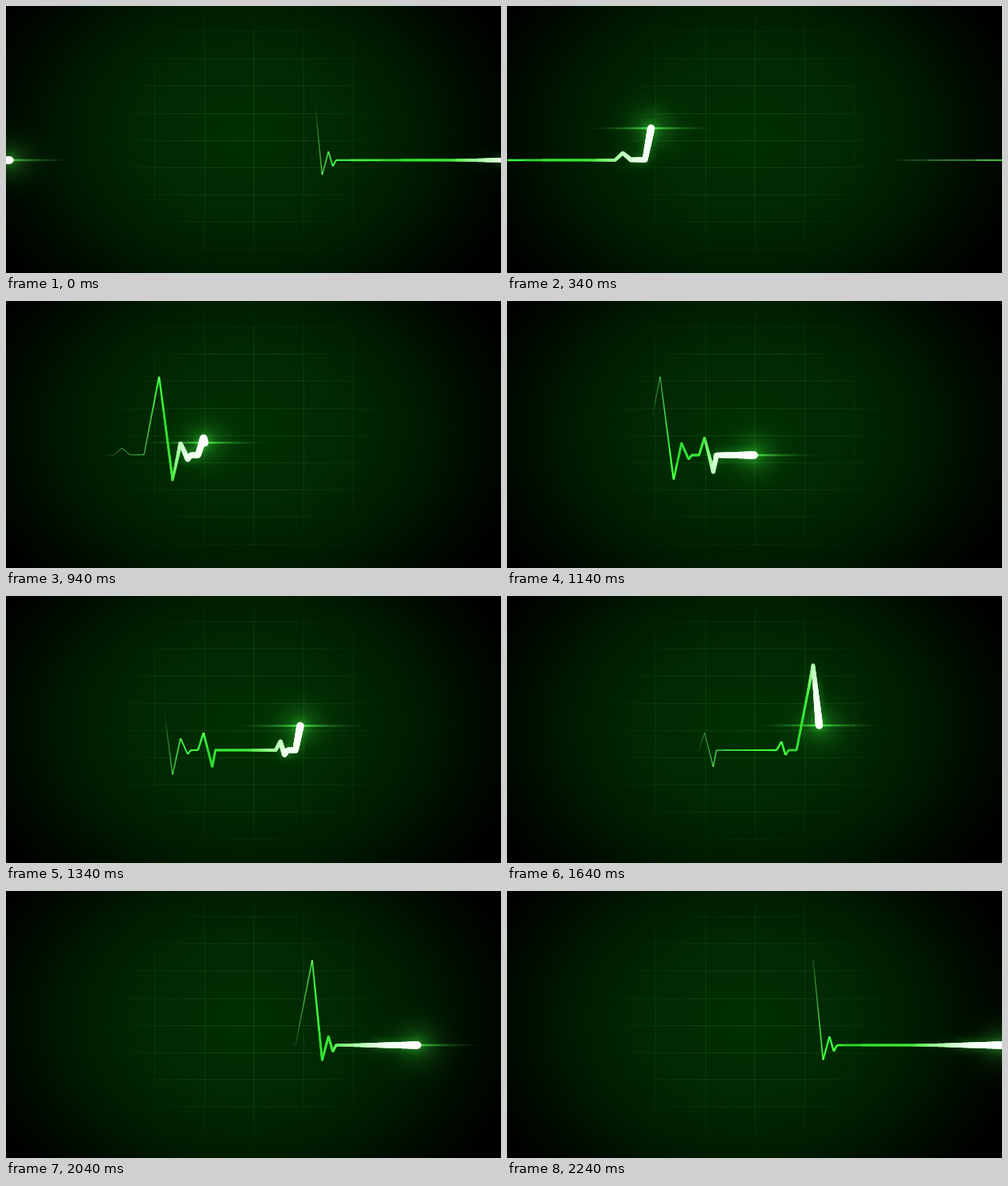
Recreate the animation shown at these times as an HTML page with a canvas. Size 624 by 336 pixels, loop 2340 ms.

```html
<!DOCTYPE html>
<html lang="en">
<head>
<meta charset="utf-8">
<title>Heart monitor</title>
<style>
html, body { margin: 0; width: 100%; height: 100%; overflow: hidden; background: #000; }
canvas { display: block; }
</style>
</head>
<body>
<canvas id="stage" width="624" height="336"></canvas>
<script>
const W = 624, H = 336, LOOP = 2340, TAIL = 408, BASE = 194;
const canvas = document.getElementById('stage');
const ctx = canvas.getContext('2d');

// Heartbeat line; it runs past the right edge before wrapping
const pulse = [
  [0, BASE], [136, BASE], [146, 185], [156, 193.5], [174, 193.5], [193, 95], [210, 225],
  [220, 179], [229, 199], [233, BASE], [242, BASE], [249, 172], [260, 215],
  [264, BASE], [340, BASE], [346, 183], [351, 200], [355, BASE], [365, BASE],
  [386, 87], [398.5, 213], [406.5, 183], [412, 202], [416, BASE], [670, BASE]
];
const dist = [0];
for (let i = 1; i < pulse.length; i++) {
  const [a, b] = [pulse[i - 1], pulse[i]];
  dist.push(dist[i - 1] + Math.hypot(b[0] - a[0], b[1] - a[1]));
}
const LENGTH = dist[dist.length - 1];

// Rows of [key, value, value...], blended linearly
function ramp(rows, x) {
  if (x <= rows[0][0]) return rows[0].slice(1);
  for (let i = 1; i < rows.length; i++) {
    const a = rows[i - 1], b = rows[i];
    if (x <= b[0]) {
      const k = (x - a[0]) / (b[0] - a[0]);
      return a.slice(1).map((v, j) => v + (b[j + 1] - v) * k);
    }
  }
  return rows[rows.length - 1].slice(1);
}

const route = pulse.map((p, i) => [dist[i], p[0], p[1]]);
const pointAt = s => ramp(route, s);

// step -> distance travelled by the head
const travel = [[0, 5], [4, 221], [10, 526], [14, 740], [17, 894], [21, 1107], [23, 1212]];

// distance behind the head -> width, r, g, b, alpha
const trail = [
  [0, 9.6, 255, 255, 255, 1],
  [45, 6.6, 235, 255, 235, 1],
  [80, 4.3, 165, 252, 160, 1],
  [115, 3, 65, 232, 60, 1],
  [190, 2.7, 45, 220, 45, 1],
  [260, 2.1, 60, 205, 60, 0.95],
  [330, 1.5, 85, 185, 85, 0.75],
  [380, 1.1, 95, 165, 95, 0.5],
  [TAIL, 0.8, 95, 150, 95, 0]
];

function makeBackdrop() {
  const c = document.createElement('canvas');
  c.width = W;
  c.height = H;
  const g = c.getContext('2d');
  g.fillStyle = '#000';
  g.fillRect(0, 0, W, H);

  g.save();
  g.translate(302, 162);
  g.scale(1, 0.8);
  const shade = g.createRadialGradient(0, 0, 0, 0, 0, 345);
  shade.addColorStop(0, 'rgb(1,47,2)');
  shade.addColorStop(0.35, 'rgb(1,41,2)');
  shade.addColorStop(0.62, 'rgb(0,28,1)');
  shade.addColorStop(0.82, 'rgb(0,13,0)');
  shade.addColorStop(1, 'rgb(0,2,0)');
  g.fillStyle = shade;
  g.fillRect(-W, -H, W * 2, H * 2);
  g.restore();

  const line = g.createRadialGradient(305, 160, 0, 305, 160, 215);
  line.addColorStop(0, 'rgba(45,130,50,.3)');
  line.addColorStop(0.5, 'rgba(40,120,45,.2)');
  line.addColorStop(1, 'rgba(30,100,35,0)');
  g.fillStyle = line;
  for (let i = 0; i < 9; i++) g.fillRect(0, Math.round(32 + i * 34.2), W, 1);
  for (let i = 0; i < 5; i++) g.fillRect(Math.round(187 + i * 62.5), 0, 1, H);
  return c;
}
const backdrop = makeBackdrop();

function blob(x, y, rx, ry, stops) {
  ctx.save();
  ctx.translate(x, y);
  ctx.scale(1, ry / rx);
  const g = ctx.createRadialGradient(0, 0, 0, 0, 0, rx);
  stops.forEach(([k, color]) => g.addColorStop(k, color));
  ctx.fillStyle = g;
  ctx.fillRect(-rx, -rx, rx * 2, rx * 2);
  ctx.restore();
}

function glow(head, from, to, width, color, blur) {
  const start = Math.max(0, head - to), end = Math.min(LENGTH, head - from);
  if (end <= start) return;
  ctx.save();
  ctx.lineWidth = width;
  ctx.lineCap = ctx.lineJoin = 'round';
  ctx.strokeStyle = ctx.shadowColor = color;
  ctx.shadowBlur = blur;
  ctx.beginPath();
  ctx.moveTo(...pointAt(start));
  for (let s = start + 1; s < end; s++) ctx.lineTo(...pointAt(s));
  ctx.lineTo(...pointAt(end));
  ctx.stroke();
  ctx.restore();
}

function drawTrail(head) {
  const step = 1.5;
  for (let d = TAIL; d > 0; d -= step) {
    const a = head - d, b = Math.min(head, a + step);
    if (a < 0 || b > LENGTH) continue;
    const [w, r, g, bl, alpha] = ramp(trail, d);
    // Additive butt joints keep the fading part free of seams
    const fading = d > 200;
    ctx.globalCompositeOperation = fading ? 'lighter' : 'source-over';
    ctx.lineCap = fading ? 'butt' : 'round';
    ctx.lineWidth = w;
    ctx.strokeStyle = `rgba(${r},${g},${bl},${alpha})`;
    ctx.beginPath();
    ctx.moveTo(...pointAt(a));
    ctx.lineTo(...pointAt(b));
    ctx.stroke();
  }
  ctx.globalCompositeOperation = 'source-over';
}

function drawBeam(head) {
  const [x, y] = pointAt(Math.min(head, LENGTH));
  const lit = head <= LENGTH;
  ctx.globalCompositeOperation = 'lighter';
  if (lit) {
    blob(x, y, 62, 56, [[0, 'rgba(60,170,60,.5)'], [0.3, 'rgba(40,130,40,.24)'],
      [0.6, 'rgba(25,85,25,.09)'], [1, 'rgba(10,50,10,0)']]);
    blob(x, y, 82, 2.2, [[0, 'rgba(110,230,110,.7)'], [0.45, 'rgba(60,160,60,.4)'],
      [1, 'rgba(30,100,30,0)']]);
  }
  ctx.globalCompositeOperation = 'source-over';
  glow(head, 90, 260, 1.5, 'rgba(30,170,30,.4)', 6);
  glow(head, 0, 90, 3, 'rgba(50,220,50,.6)', 20);
  glow(head, 0, 55, 5, 'rgba(90,255,90,.7)', 11);
  drawTrail(head);
}

function draw(step) {
  ctx.drawImage(backdrop, 0, 0);
  const [head] = ramp(travel, step);
  if (head < TAIL) drawBeam(head + LENGTH);
  drawBeam(head);
}

let shown = -1;
function tick() {
  const t = performance.now() % LOOP;
  const step = t < 40 ? 0 : 1 + Math.floor((t - 40) / 100);
  if (step !== shown) {
    shown = step;
    draw(step);
  }
  requestAnimationFrame(tick);
}
tick();
</script>
</body>
</html>
```
